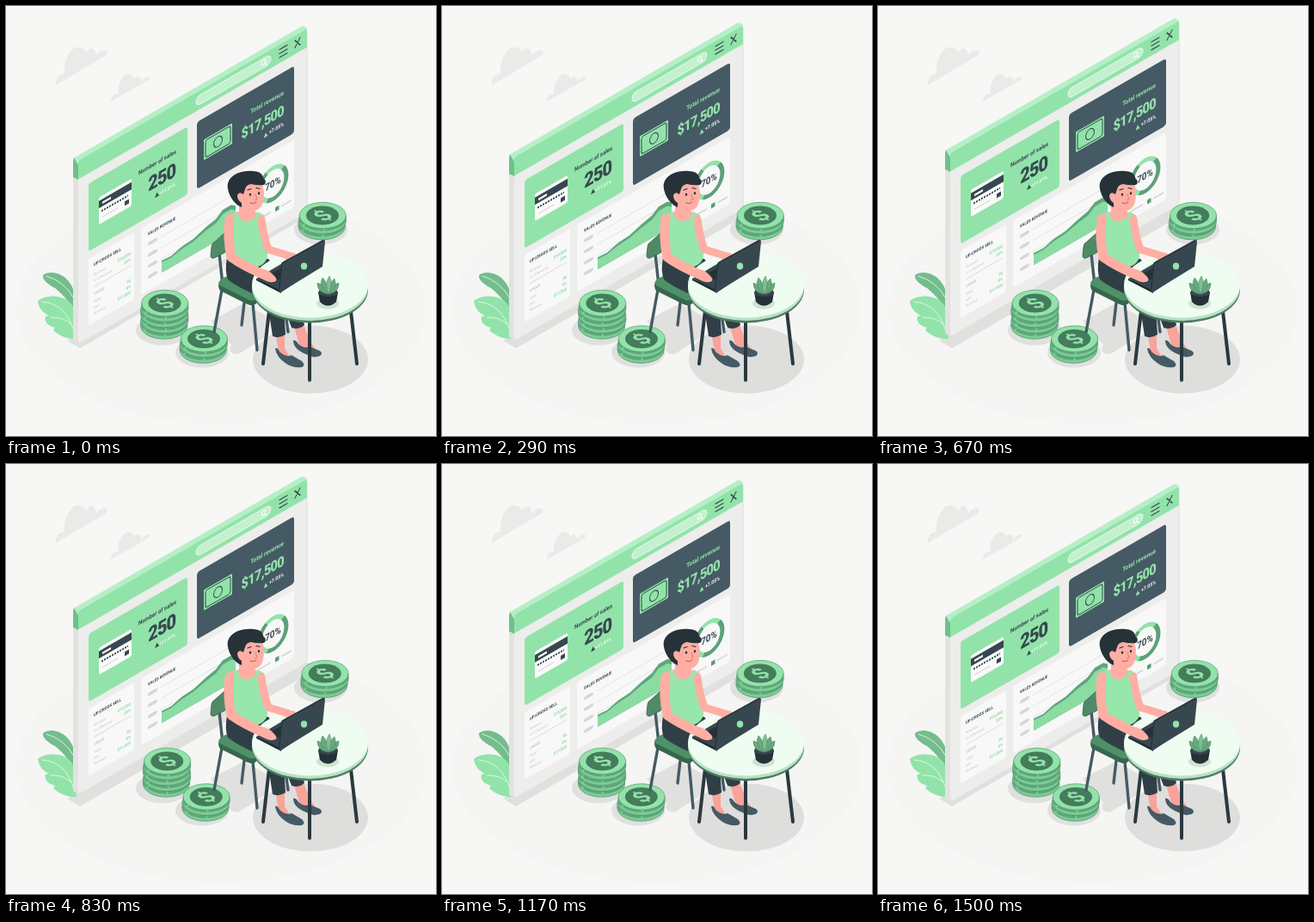
Animation of 500x500 px, one loop 1540 ms. Source, as an HTML page:

```html
<!DOCTYPE html>
<html lang="en">
<head>
<meta charset="utf-8">
<style>
html, body { margin: 0; width: 100%; height: 100%; overflow: hidden; background: #f7f7f6; }
svg { display: block; width: 100vw; height: 100vh; }
text { font-family: Roboto, sans-serif; font-weight: 700; }
.line { fill: none; stroke-linecap: round; stroke-linejoin: round; }
</style>
</head>
<body>
<svg viewBox="0 0 500 500">
  <defs>
    <g id="coin">
      <path d="M-27 0v6.4a27 15.2 0 0 0 54 0V0z" fill="#7bcd95" stroke="#4c8d68" stroke-width=".7"/>
      <path d="M-26.500 4.500a27 15.2 0 0 0 53 0" fill="none" stroke="#5fa67a" stroke-width="2.600" stroke-dasharray="7 2 22 2 30"/>
      <ellipse rx="27" ry="15.2" fill="#92e3a9" stroke="#4c8d68" stroke-width=".6"/>
    </g>
    <g id="face">
      <ellipse rx="19" ry="11" fill="#457c5c"/>
      <text transform="matrix(.866 -.5 .866 .5 0 0)" y="8.600" font-size="24" text-anchor="middle" fill="#92e3a9">$</text>
    </g>
  </defs>

  <ellipse cx="250" cy="352" rx="238" ry="135" fill="#f5f5f4"/>
  <g fill="#eaeae9">
    <path d="M58 92C57 84 62 79 68 79C67 61 76 47 84 48Q91 48 93 54C98 45 105 49 104 58C108 51 116 50 118 53Q118 56 115 58z"/>
    <path d="M122 111C122 104 126 102 130 102C130 90 136 78 143 79Q148 79 149 85C153 79 158 83 157 89C160 83 166 80 167 83Q167 86 164 87z"/>
  </g>
  <g fill="#e0e0df">
    <path d="M71 389L86 398L362 238L348 230z"/>
    <ellipse cx="182" cy="377" rx="31" ry="17.500"/>
    <ellipse cx="228" cy="403" rx="31" ry="17.500"/>
    <ellipse cx="366" cy="260" rx="31" ry="17.500"/>
    <path d="M238 366L276 346L306 362L300 386L270 405Q256 404 262 394z"/>
    <ellipse cx="354" cy="411" rx="67" ry="39.500" fill="#dededd"/>
  </g>

  <path d="M43 313C50 307 72 309 79 332V354C72 341 64 334 57 328C49 324 42 318 43 313z" fill="#74bd8d"/>
  <path d="M37 343C46 335 72 334 79 352L82 387C74 388 62 384 55 377L57 374C48 372 44 366 46 361L50 360C42 357 38 350 37 343z" fill="#92e3a9"/>
  <path class="line" d="M47 314Q68 320 79 340M42 344Q70 346 79 378M52 362Q66 361 76 370" stroke="#e6f8ec" stroke-width=".9"/>

  <g id="board">
    <path d="M78 196L84 200V393L78 389z" fill="#e2e2e1"/>
    <path d="M78 199V180Q78 177 80 176L86 180L84 202z" fill="#6fc08a"/>
    <path d="M79 176.500L344 23.500Q346 22.500 350 26L350 31L84 185z" fill="#b6efc6"/>
    <g transform="matrix(1 -.577 0 1 84 181)" id="panel">
      <rect width="266" height="212" rx="3" fill="#ededec"/>
      <path d="M266 2V211" stroke="#d8d8d8" stroke-width=".8"/>
      <path d="M0 20.500V2Q0 -1 3 -1H263Q266 -1 266 2V20.500z" fill="#92e3a9"/>
      <rect x="137" y="4" width="87" height="11" rx="5.500" fill="#c3f0cf" stroke="#e6f9ec"/>
      <g class="line" stroke="#fff"><ellipse cx="215.500" cy="9" rx="2.300" ry="2.600"/><path d="M217 11l2 2.500"/></g>
      <path class="line" d="M234 4.700h9m-9 4.600h9m-9 4.600h9M252 4.500l6 8.500m0-8.500l-6 8.500" stroke="#37474f" stroke-width="1.300"/>
      <rect x="12" y="32.500" width="115" height="79" rx="3" fill="#92e3a9"/>
      <rect x="138" y="33.500" width="113" height="78" rx="3" fill="#455a64"/>
      <g fill="#f8f8f8">
        <rect x="12" y="119.500" width="53" height="78" rx="2.500"/>
        <rect x="73" y="119.500" width="178" height="78" rx="2.500"/>
      </g>

      <rect x="24" y="55.500" width="38" height="31.500" rx="2" fill="#fafafa"/>
      <path d="M24 59.500h38v8.500H24zM54 77.500h5v5h-5z" fill="#37474f"/>
      <path d="M28 64h10" stroke="#fff" stroke-width="2.500"/>
      <path d="M27 73h31" stroke="#37474f" stroke-width="2" stroke-dasharray="2 1"/>
      <path d="M28 80.500h18" stroke="#d0d0d0"/>
      <path d="M89 93.500l2.500-5l2.500 5z" fill="#37474f"/>

      <rect x="146" y="58.500" width="33" height="24" rx="1" fill="#92e3a9"/>
      <g fill="none" stroke="#37474f">
        <rect x="148" y="60.500" width="29" height="20" rx="2.500"/>
        <ellipse cx="162.500" cy="70.500" rx="5" ry="5.800"/>
      </g>
      <path d="M215.500 97l2.500-5l2.500 5z" fill="#92e3a9"/>

      <path d="M18 156h43" stroke="#d4d4d4" stroke-width=".8"/>
      <path d="M96 143h113m-113 13h113m-113 13h113m-113 12.500h113" stroke="#dedede" stroke-width=".8"/>
      <path class="line" d="M83 143h7m-7 13h7m-7 13h7m-7 12.500h7" stroke="#d6d6d6" stroke-width="4"/>
      <path d="M97 185V171L108 172L121 168L134 167L148 162L160 159L168 153L178 153L183 157V185z" fill="#5fa67a"/>
      <path d="M97 185V173L108 174L121 171L134 170L148 166L160 164L168 158L178 158L183 162V185z" fill="#8bdca3"/>
      <g fill="none" stroke-width="4.800">
        <ellipse cx="226.500" cy="156" rx="15.300" ry="18" stroke="#92e3a9"/>
        <path d="M238 144A15.300 18 0 0 1 220 172.300M211.200 156A15.300 18 0 0 1 219 140.300" stroke="#5f9f79"/>
      </g>
      <path d="M229 185.500h4.500v5H229z" fill="#5a9e74"/>
      <path d="M236 188h12m-40 0h16" stroke="#d6d6d6" stroke-width="1.800"/>
    </g>
  </g>

  <g id="coins"></g>

  <g class="line" stroke="#455a64" stroke-width="3.400">
    <path d="M248 288L252 325M251 330L242 379M287 346L292 400M277 345L274 371M324 350L328 379"/>
  </g>
  <path d="M239 280Q239 276 243 274L254 264Q257 263 257 267V282Q257 285 254 287L242 293Q238 294 238 290z" fill="#4f8a67" stroke="#37604a" stroke-width=".8"/>
  <path d="M247 324Q247 319 253 316L270 308L306 328L291 344Q287 348 281 344L249 328z" fill="#4e9068"/>
  <path d="M247 324L283 342Q288 344 292 340V345Q288 350 281 347L249 331Q247 329 247 324z" fill="#37664c"/>

  <path d="M313 380L324 381L324 398L332 411L318 407zM335 373L346 371L352 386L361 402L342 397z" fill="#f9a39a"/>
  <path d="M313 398Q316 397 318 402Q326 409 332 406L344 413Q349 418 344 420Q333 421 326 416Q314 408 313 398zM334 389Q337 388 340 393Q347 399 353 396L365 401Q369 404 365 407Q356 410 349 405Q334 399 334 389z" fill="#455a64"/>
  <path d="M257 293Q254 308 258 318Q266 325 288 335L304 345L310 384Q318 387 325 382L323 350L332 374Q340 377 347 371L338 335L305 294z" fill="#303f46"/>

  <path d="M271 228L289 230L290 240L300 243L301 262L258 262L256 246Q258 241 271 239z" fill="#ffaea4"/>
  <path d="M269 240Q271 251 281 250Q291 248 292 239L298 242Q297 256 304 266L304 292Q300 304 286 304Q268 301 262 294L263 258Q267 250 264 241z" fill="#97e7ad"/>
  <path d="M266 213Q267 198 286 200Q299 202 300 217Q300 232 294 236Q289 240 279 235L271 232Q264 225 266 213z" fill="#ffaea4"/>
  <circle cx="298" cy="204.500" r="3.800" fill="#263238"/>
  <path d="M274 234C263 230 256 214 258 206C261 195 276 191 287 192Q297 192 299 199Q301 204 299 208Q292 209 285 207Q279 208 278 213L276 219Q271 215 269 220Q269 226 274 229z" fill="#263238"/>
  <g class="line" stroke="#263238">
    <path d="M281 214l4-1.500m6-1l4 1" stroke-width="1.200"/>
    <path d="M284 219v.6M294 217.500v.6" stroke-width="2.400"/>
    <path d="M290 219l2 6l-2.500.5" stroke="#d9776f" stroke-width=".9"/>
    <path d="M284 229q4 2 7-1" stroke="#b8524d"/>
  </g>

  <g class="line" stroke="#2b383f" stroke-width="4">
    <path d="M306 354L299 416M353 364V435M401 355L408 416"/>
  </g>
  <path d="M286 324v6a67.500 38.500 0 0 0 135 0v-6z" fill="#4d7b62"/>
  <path d="M286 324v3.500a67.500 38.500 0 0 0 135 0v-3.500z" fill="#b9e2c6"/>
  <ellipse cx="353.500" cy="324" rx="67.500" ry="38.500" fill="#effcf2"/>

  <ellipse cx="374" cy="346" rx="13" ry="6.500" fill="#cfe3d5"/>
  <path d="M363 333L365 344Q374 353 384 344L386 333z" fill="#263238"/>
  <ellipse cx="374.500" cy="333" rx="11.500" ry="5" fill="#37474f"/>
  <g fill="#69a97f" stroke="#4d8763" stroke-width=".6">
    <path d="M374 335Q362 333 362 322Q371 324 374 335zM375 335Q387 333 387 322Q378 324 375 335z"/>
    <path d="M373 335Q363 325 368 316Q375 322 374 335zM376 335Q386 327 382 317Q375 322 375 335z"/>
    <path d="M374.500 335Q370 324 376 314Q381 325 374.500 335z" fill="#7fbf94"/>
  </g>

  <path class="line" d="M297 248Q299 267 305 283Q315 286 331 291" stroke="#ffaea4" stroke-width="9"/>
  <path d="M291 317L325 297L352 311L320 333z" fill="#37474f"/>
  <path d="M291 317L320 331V334L291 319z" fill="#1f2a30"/>
  <path d="M299 316L325 302L334 307L311 322z" fill="#263238"/>
  <path d="M325 291L335 288L338 293L327 298z" fill="#ffaea4" stroke="#ffaea4" stroke-width="2" stroke-linejoin="round"/>
  <path d="M321 298L368 272Q371 271 371 274L368 303L319 333Q317 333 317 330z" fill="#37474f"/>
  <path class="line" d="M368.500 273L321 299L317.500 331" stroke="#263238" stroke-width="1.200"/>
  <ellipse cx="346.500" cy="302.500" rx="3.700" ry="4" fill="#92e3a9"/>
  <path class="line" d="M260 248Q257 270 262 292Q276 302 299 312" stroke="#ffaea4" stroke-width="11"/>
  <path d="M296 306Q305 305 313 315Q317 320 311 321Q303 322 295 315z" fill="#ffaea4"/>
</svg>
<script>
const $ = id => document.getElementById(id);
const GREEN = '#84d99c', LIGHT = '#92e3a9', DARK = '#37474f', GREY = '#c4c4c4', WHITE = '#fafafa';

const label = (x, y, size, str, fill, anchor = 'end', extra = '') =>
  `<text transform="translate(${x} ${y}) scale(.866 1)" font-size="${size}" fill="${fill}" text-anchor="${anchor}" ${extra}>${str}</text>`;

const left = (x, y, size, str, fill, extra) => label(x, y, size, str, fill, 'start', extra);
const thin = 'style="font-weight:400"';
const heavy = 'style="font-weight:900;letter-spacing:-.05em"';

const labels = [
  label(114, 56, 6.9, 'Number of sales', DARK),
  label(113, 82, 23, '250', DARK, 'end', heavy),
  label(113, 93.5, 5.6, '+11.01%', WHITE),
  label(239, 60, 7.4, 'Total revenue', LIGHT),
  label(239, 83.5, 16.8, '$17,500', LIGHT, 'end', heavy),
  label(239, 96, 6, '+7.05%', WHITE),
  left(18, 132, 5, 'UP/CROSS SELL', DARK),
  left(18, 143.5, 4.2, 'Revenue', GREY, thin),
  left(18, 150.5, 4.2, '% of Revenue', GREY, thin),
  label(61, 143.5, 4.8, '$15,000', GREEN),
  label(61, 150.5, 4.8, '25%', GREEN),
  left(18, 166, 4.4, 'CROSS', GREY),
  left(18, 175, 4.2, 'Total', GREY, thin),
  left(18, 182, 4.2, 'Sell', GREY, thin),
  left(18, 188.6, 4.2, 'Revenue', GREY, thin),
  label(61, 174.5, 4.8, '36', GREEN),
  label(61, 181.5, 4.8, '9%', GREEN),
  label(61, 188.5, 4.8, '$17,500', GREEN),
  left(81, 132.7, 4.9, 'SALES REVENUE', DARK),
  label(226.5, 160, 11.4, '70%', DARK, 'middle'),
];
$('panel').insertAdjacentHTML('beforeend', labels.join(''));

const stack = (x, y, count) => {
  let out = '';
  for (let i = count - 1; i >= 0; i--) {
    out += `<use href="#coin" x="${x + (i % 2 ? -.8 : .3)}" y="${y + i * 6.7}"/>`;
  }
  return out + `<use href="#face" x="${x}" y="${y}"/>`;
};
$('coins').innerHTML = stack(368, 243.5, 2) + stack(184.5, 345.5, 4) + stack(230, 387, 2);

// Timing curve cubic-bezier(.36, .07, .19, .97)
const bezier = (s, a, b) => 3 * (1 - s) ** 2 * s * a + 3 * (1 - s) * s * s * b + s ** 3;
function ease(x) {
  let lo = 0, hi = 1;
  for (let i = 0; i < 24; i++) {
    const mid = (lo + hi) / 2;
    if (bezier(mid, .36, .19) < x) lo = mid; else hi = mid;
  }
  return bezier(lo, .07, .97);
}

const LOOP = 1540, CYCLE = 1500, FPS = 24;
const SHAKE = [0, -1, 2, -4, 4, -4, 4, -4, 2, -1, 0];

function shake(p) {
  const i = Math.min(9, Math.floor(p * 10 + 1e-9));
  return SHAKE[i] + (SHAKE[i + 1] - SHAKE[i]) * ease(p * 10 - i);
}

const start = performance.now();
function draw() {
  const t = (performance.now() - start) % LOOP;
  // The motion is stepped at 24 poses per second, then rests until the loop ends
  const step = Math.floor((t + 9.9) * FPS / 1000);
  const p = Math.min(1, step / FPS * 1000 / CYCLE);
  const lift = 10 * (1 - Math.abs(1 - 2 * p));
  $('board').setAttribute('transform', `translate(0 ${-lift})`);
  $('coins').setAttribute('transform', `translate(${shake(p)} 0)`);
  requestAnimationFrame(draw);
}
draw();
</script>
</body>
</html>
```
